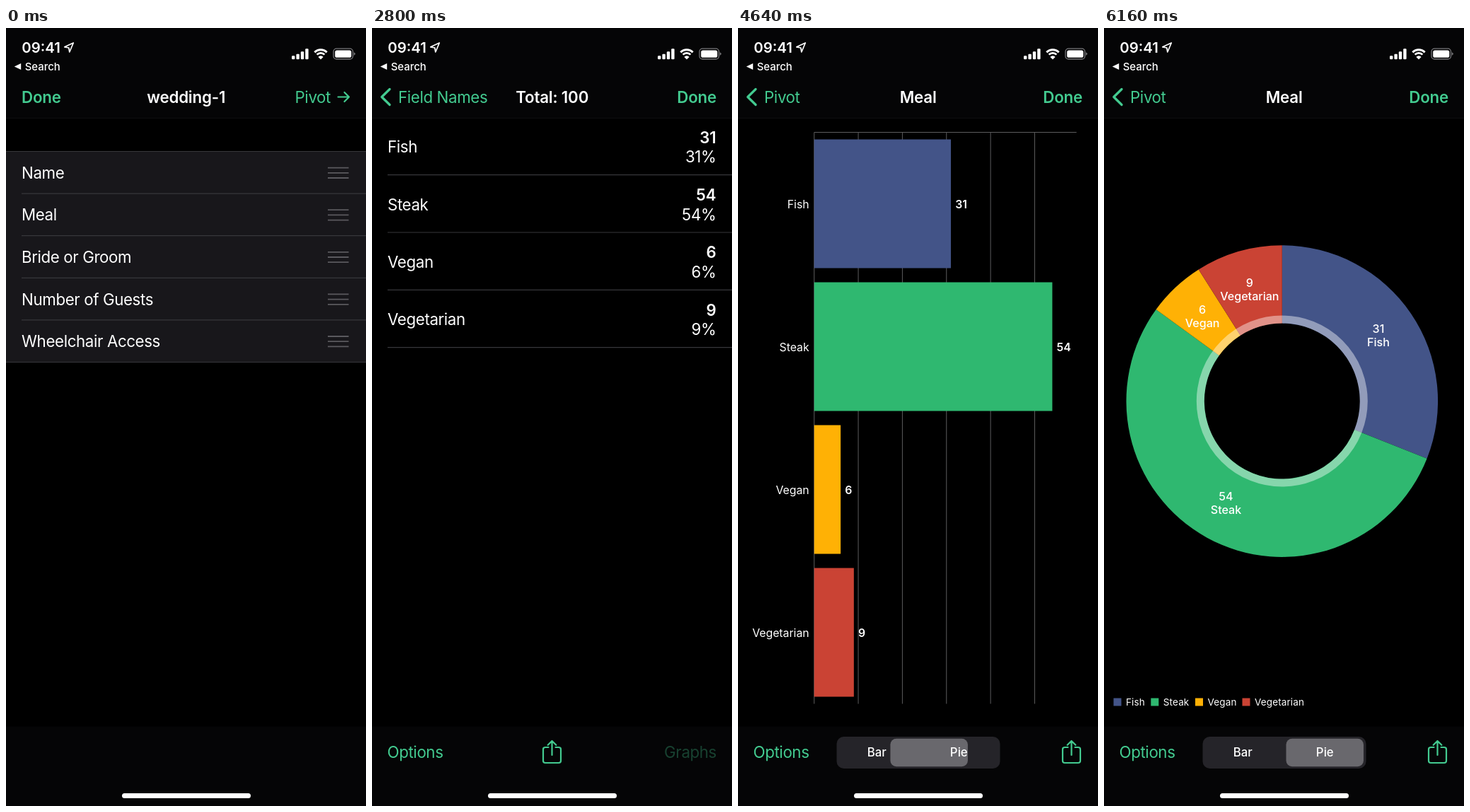
Animation of 509x1100 px, one loop 6480 ms. Source, as an HTML page:

```html
<!DOCTYPE html>
<html lang="en">
<head>
<meta charset="utf-8">
<title>Pivot charts</title>
<style>
  html, body { margin: 0; width: 100%; height: 100%; overflow: hidden; background: #000; }
  svg { display: block; width: 100vw; height: 100vh; }
  text {
    font-family: Inter, Roboto, sans-serif;
    font-size: 22.3px;
    font-optical-sizing: none;
    letter-spacing: -.017em;
    fill: #fff;
    white-space: pre;
  }
  .bold { font-weight: 600; letter-spacing: -.008em; }
  .green { fill: #43cb90; }
  .mid { text-anchor: middle; }
  .end { text-anchor: end; }
  .axis { font-size: 15.8px; letter-spacing: 0; }
  .slice { font-size: 16.1px; letter-spacing: 0; font-weight: 500; }
  .legend { font-size: 13.5px; letter-spacing: .01em; }
  .sub { font-size: 15.9px; letter-spacing: 0; font-style: italic; }
  .seg { font-size: 16.8px; letter-spacing: 0; font-weight: 500; }
  .clock { font-size: 20.4px; font-weight: 600; letter-spacing: 0; }
  .search { font-size: 14.9px; font-weight: 500; letter-spacing: 0; }
  .icon { fill: none; stroke: #43cb90; stroke-width: 2.2; stroke-linecap: round; stroke-linejoin: round; }
  .hair { fill: none; stroke: #37373b; stroke-width: 1.2; }
  .grid { fill: none; stroke: #5c5c5e; stroke-width: 1; }
  .grip { fill: none; stroke: #5a595e; stroke-width: 1.8; }
</style>
</head>
<body>
<svg id="stage" viewBox="0 0 509 1100" preserveAspectRatio="none"></svg>
<script>
const LOOP = 6480, STEP = 80, W = 509;
const ROW = 59.6, LIST_TOP = 174.5, GROW = 16.2;
const AXIS = 112.6, UNIT = 6.235;
const PIE = { x: 251.8, y: 527.6, outer: 220.3, inner: 110, label: 164.6 };
const fields = ['Name', 'Meal', 'Bride or Groom', 'Number of Guests', 'Wheelchair Access'];
const meals = [
  { name: 'Fish', n: 31, color: '#435488', key: 13.5 },
  { name: 'Steak', n: 54, color: '#2fb870', key: 66.3 },
  { name: 'Vegan', n: 6, color: '#ffb105', key: 129 },
  { name: 'Vegetarian', n: 9, color: '#ca4334', key: 195.5 }
];

const text = (x, y, str, cls = '', id = '') =>
  `<text x="${x}" y="${y}" class="${cls}" ${id && `id="${id}"`}>${str}</text>`;
const rect = (x, y, w, h, fill, more = '') =>
  `<rect x="${x}" y="${y}" width="${w}" height="${h}" fill="${fill}" ${more}/>`;
const path = (d, cls = '', more = '') => `<path d="${d}" class="${cls}" ${more}/>`;
const group = (id, ...parts) => `<g id="${id}">${parts.join('')}</g>`;
const share = x => path(
  `M${x - 5} 1017h-4.5q-3 0-3 3v16q0 3 3 3h19q3 0 3-3v-16q0-3-3-3h-4.5M${x} 1028v-20m-5.8 5.8l5.8-5.8 5.8 5.8`, 'icon');

function listScreen() {
  const rows = fields.map((name, i) => {
    const y = LIST_TOP + ROW * i, mid = y + ROW / 2;
    const grip = [-7.2, 0, 7.2].map(d => `M455 ${mid + d + .5}h29.5`).join('');
    return group('row' + i,
      i ? path(`M22 ${y}H509`, 'hair') : '',
      text(22, mid + 8.5, name, '', 'name' + i),
      path(grip, 'grip', `id="grip${i}"`));
  });
  const extra = group('extra',
    text(22, 291.8, 'summarisation field', 'sub'),
    path('M404.5 273.5l6.3 8L423 264.5', 'icon', 'style="stroke-width:3"'),
    path('M441.5 234V309.5', 'hair'));
  return group('list',
    rect(0, LIST_TOP, W, ROW * 5, '#18171b', 'id="panel"'),
    path(`M0 ${LIST_TOP}H509`, 'hair'), ...rows, extra,
    path(`M0 ${LIST_TOP + ROW * 5}H509`, 'hair', 'id="bottom"'));
}

function pivotScreen() {
  const rows = meals.map(({ name, n }, i) => {
    const y = 126.4 + 81.3 * i;
    return text(22, y + 50, name) + text(486.5, y + 36.2, n, 'bold end') +
      text(486.5, y + 64, n + '%', 'end') + path(`M22 ${y + 81.3}H509`, 'hair');
  });
  return group('pivot', rect(0, 127, W, 861, '#000'), ...rows);
}

function chartScreen() {
  const lines = [1, 2, 3, 4, 5].map(i => `M${AXIS + i * 10 * UNIT} 147.5V955.5`).join('');
  const bars = meals.map(({ name, n, color }, i) => {
    const y = 157.5 + 202 * i;
    return rect(AXIS, y, 0, 182, color, `id="bar${i}"`) +
      text(105.5, y + 97, name, 'axis end') +
      text(0, y + 97, n, 'axis bold', 'val' + i);
  });
  const slices = meals.map((m, i) => path('', '', `id="slice${i}" fill="${m.color}"`));
  const labels = meals.map((m, i) => group('label' + i,
    text(0, -3.9, m.n, 'slice mid'), text(0, 15.4, m.name, 'slice mid')));
  const keys = meals.map(m =>
    rect(m.key, 947.5, 11, 11, m.color) + text(m.key + 17.5, 958, m.name, 'legend'));
  return group('chart', rect(0, 127, W, 861, '#000'),
    group('barPage', path(`M483.5 147.5H${AXIS}V955.5${lines}`, 'grid'), ...bars),
    group('piePage', ...slices,
      `<circle id="ring" cx="${PIE.x}" cy="${PIE.y}" r="115.5" fill="none" stroke="#fff" stroke-width="11"/>`,
      ...labels, ...keys));
}

function bars() {
  return rect(0, 0, W, 127.5, '#050506') + path('M0 127.5H509', '', 'stroke="#0e0e10"') +
    rect(0, 987.5, W, 112.5, '#050506') +
    group('nav0',
      text(22, 105.7, 'Done', 'bold green'),
      group('pivotButton', text(408.5, 105.7, 'Pivot', 'green'),
        path('M469.5 97.5h15.5m-6.5-6.5l6.5 6.5-6.5 6.5', 'icon'))) +
    text(254.7, 105.7, 'wedding-1', 'bold mid', 'title0') +
    text(254.7, 105.7, 'Total: 100', 'bold mid', 'title1') +
    text(254.7, 105.7, 'Meal', 'bold mid', 'title2') +
    text(37, 105.7, 'Field Names', 'green', 'back1') +
    text(37, 105.7, 'Pivot', 'green', 'back2') +
    group('common',
      path('M25 86.5L13.8 97.5 25 108.5', 'icon', 'style="stroke-width:3.3"'),
      text(487, 105.7, 'Done', 'bold green end'),
      text(21.5, 1032.3, 'Options', 'green')) +
    group('tools1', share(254.5), text(487, 1032.3, 'Graphs', 'green end', 'graphs')) +
    group('tools2',
      rect(139.5, 1002, 231, 45, '#252429', 'rx="10"'),
      rect(142, 1004.7, 109.5, 39.5, '#69686d', 'rx="8.5" id="pill"'),
      text(196.3, 1030.3, 'Bar', 'seg mid'), text(312.3, 1030.3, 'Pie', 'seg mid'),
      share(471.5));
}

function statusBar() {
  const signal = [5, 7.5, 11, 15].map((h, i) =>
    rect(404 + 6.4 * i, 44.3 - h, 4.4, h, '#fff', 'rx="1.2"')).join('');
  const arc = (r, w) => {
    const d = r * .707, y = 43 - d;
    return path(`M${445 - d} ${y}A${r} ${r} 0 0 1 ${445 + d} ${y}`, '',
      `fill="none" stroke="#fff" stroke-width="${w}"`);
  };
  return text(22.3, 35, '09:41', 'clock') +
    path('M95.3 21L82.8 26.8l6 1.2 1 6z', '', 'fill="none" stroke="#fff" stroke-width="1.7" stroke-linejoin="round"') +
    path('M11.8 54.5l9.4-4.6v9.2z', '', 'fill="#fff"') + text(26.7, 59.6, 'Search', 'search') +
    signal + arc(12.2, 3) + arc(7.6, 2.8) + path('M445 44.5l-3.6-3.6a5 5 0 0 1 7.2 0z', '', 'fill="#fff"') +
    rect(463, 29.2, 27.5, 14.8, 'none', 'rx="4.3" stroke="#77777a" stroke-width="1.3"') +
    rect(465.2, 31.4, 23.1, 10.4, '#fff', 'rx="2.6"') +
    path('M491.8 34.3q2 .8 2 2.3t-2 2.3z', '', 'fill="#77777a"') +
    rect(164, 1082, 182, 7, '#fff', 'rx="3.5"');
}

const stage = document.getElementById('stage');
stage.innerHTML = rect(0, 0, W, 1100, '#000') + listScreen() + pivotScreen() + chartScreen() + bars() + statusBar();
const el = {};
stage.querySelectorAll('[id]').forEach(e => el[e.id] = e);

const clamp = x => Math.min(1, Math.max(0, x));
const ease = (t, start, span) => (1 - Math.cos(Math.PI * clamp((t - start) / span))) / 2;
const spring = (t, start, rate) => {
  const x = Math.max(0, t - start) / 1000 * rate;
  return 1 - (1 + x) * Math.exp(-x);
};
const move = (id, x, y = 0) => el[id].setAttribute('transform', `translate(${x} ${y})`);
const fade = (id, a) => el[id].setAttribute('opacity', clamp(a));
const polar = (turn, r) => {
  const a = turn * 2 * Math.PI;
  return [PIE.x + r * Math.sin(a), PIE.y - r * Math.cos(a)];
};

function sector(from, to) {
  const { outer, inner } = PIE, big = to - from > .5 ? 1 : 0;
  return `M${polar(from, outer)}A${outer} ${outer} 0 ${big} 1 ${polar(to, outer)}` +
    `L${polar(to, inner)}A${inner} ${inner} 0 ${big} 0 ${polar(from, inner)}Z`;
}

function drawList(k) {
  const dy = GROW * k;
  el.panel.setAttribute('height', ROW * 5 + dy);
  move('bottom', 0, dy);
  [2, 3, 4].forEach(i => move('row' + i, 0, dy));
  move('name1', 0, -4 * k);
  move('grip1', 0, dy / 2);
  fade('extra', k);
}

function drawBars(phase) {
  meals.forEach(({ n }, i) => {
    const w = n * UNIT * phase;
    el['bar' + i].setAttribute('width', w);
    el['val' + i].setAttribute('x', AXIS + w + 6.2);
  });
}

function drawPie(phase) {
  let sum = 0;
  meals.forEach(({ n }, i) => {
    const from = sum / 100 * phase, to = (sum += n) / 100 * phase;
    el['slice' + i].setAttribute('d', phase ? sector(from, to) : '');
    move('label' + i, ...polar((from + to) / 2, PIE.label));
  });
  fade('ring', .42 * phase);
}

function drawNav(p1, p2) {
  fade('nav0', 1 - 2 * p1);
  fade('title0', 1 - 2 * p1);
  move('title0', -150 * p1);
  fade('title1', p1 * (1 - 2 * p2));
  move('title1', 75 * (1 - p1) - 150 * p2);
  fade('back1', p1 * (1 - 2 * p2));
  move('back1', 100 * (1 - p1) - 60 * p2);
  fade('title2', p2);
  move('title2', 75 * (1 - p2));
  fade('back2', p2);
  move('back2', 75 * (1 - p2));
  fade('common', p1);
  fade('tools1', p1 * (1 - 1.5 * p2));
  fade('tools2', p2);
}

function draw(t) {
  const p1 = spring(t, 1395, 20), p2 = spring(t, 2915, 20);
  const page = ease(t, 4620, 320);
  drawList(ease(t, 440, 340));
  drawBars(ease(t, 3125, 600));
  drawPie(ease(t, 4770, 700));
  drawNav(p1, p2);
  move('list', -.3 * W * p1);
  move('pivot', W * (1 - p1) - .3 * W * p2);
  move('chart', W * (1 - p2));
  move('barPage', -W * page);
  move('piePage', W * (1 - page));
  move('pill', 115.5 * spring(t, 4520, 18));
  fade('pivotButton', t >= 1200 ? .3 : 1);
  fade('graphs', t >= 2800 ? .3 : 1);
}

function tick() {
  const t = performance.now() % LOOP;
  draw(t - t % STEP);
  requestAnimationFrame(tick);
}
tick();
</script>
</body>
</html>
```
